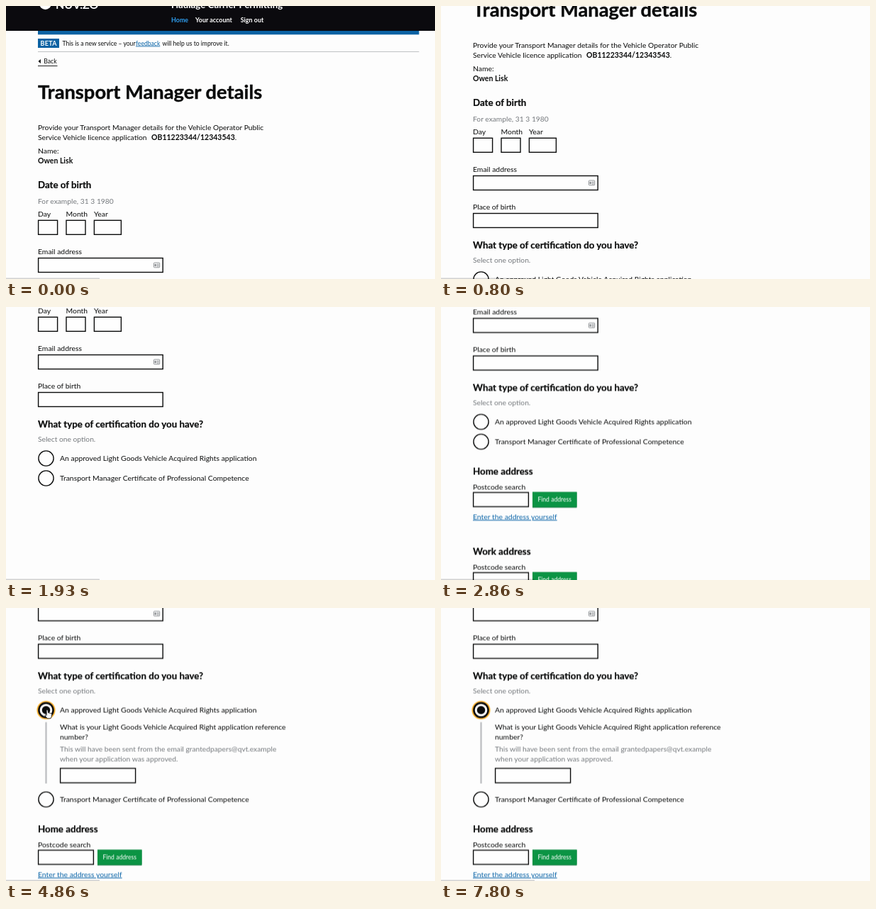
Animation of 605x385 px, one loop 7860 ms. Source, as an HTML page:

```html
<!DOCTYPE html>
<html lang="en">
<head>
<meta charset="utf-8">
<title>Transport Manager details</title>
<style>
  html, body { margin: 0; width: 100%; height: 100%; overflow: hidden; background: #fdfdfd; }
  svg { display: block; width: 605px; height: 385px; }

  text { font: 400 10.4px Lato, "Open Sans", sans-serif; fill: #0b0c0c; }
  .bold { font-weight: 700; font-size: 10.5px; }
  .h1 { font-size: 27.3px; font-weight: 700; stroke: #0b0c0c; stroke-width: .4px; }
  .h2 { font-size: 13.3px; font-weight: 700; stroke: #0b0c0c; stroke-width: .2px; }
  .lead { font-size: 10.3px; }
  .small { font-size: 8.6px; }
  .nav { font-size: 8.95px; font-weight: 700; }
  .hint { fill: #75797d; font-size: 10.25px; }
  .white { fill: #fff; stroke: none; }
  .current { fill: #2e9cec; }
  .link { fill: #0b65a8; text-decoration: underline; }
  .field rect, .field circle { fill: #fefefe; stroke: #0b0c0c; stroke-width: 1.4px; }

  /* The clock ticks 15 times a second; the short lead absorbs rounding. */
  .page, .late, .chosen, .below, .hand {
    animation: 7860ms -8ms infinite step-end;
  }
  .page { animation-name: scroll; }
  .late { animation-name: load; }
  .chosen { animation-name: choose; }
  .below { animation-name: push; }
  .hand { animation-name: point; }

  @keyframes scroll {
    0% { transform: translateY(0); animation-timing-function: steps(12); }
    10.178% { transform: translateY(-116px); animation-timing-function: steps(10); }
    18.66% { transform: translateY(-210.5px); animation-timing-function: steps(2); }
    20.356% { transform: translateY(-238.5px); animation-timing-function: steps(5); }
    24.597% { transform: translateY(-288px); animation-timing-function: steps(7); }
    30.534% { transform: translateY(-326px); animation-timing-function: steps(7); }
    36.472% { transform: translateY(-339.5px); animation-timing-function: steps(9); }
    44.105%, 100% { transform: translateY(-357.5px); }
  }
  @keyframes load {
    0% { opacity: 0; }
    31.382%, 100% { opacity: 1; }
  }
  @keyframes choose {
    0% { opacity: 0; }
    55.98%, 100% { opacity: 1; }
  }
  @keyframes push {
    0% { transform: translateY(0); }
    55.98%, 100% { transform: translateY(98px); }
  }
  @keyframes point {
    0% { opacity: 0; transform: translate(40px, 186px); }
    46.65% { opacity: 1; transform: translate(40px, 186px); animation-timing-function: steps(8); }
    53.435% { opacity: 1; transform: translate(58px, 144px); }
    83.12% { opacity: 1; transform: translate(58px, 144px); animation-timing-function: steps(6); }
    88.21%, 100% { opacity: 0; transform: translate(21px, 160px); }
  }
</style>
</head>
<body>
<svg viewBox="0 0 605 385">
  <defs>
    <g id="finder">
      <text x="45" y="596.5">Postcode search</text>
      <g class="field"><rect x="45.6" y="601.1" width="77.8" height="20"/></g>
      <rect x="129" y="600.5" width="62.5" height="22" fill="#0a7236"/>
      <rect x="129" y="600.5" width="62.5" height="21" fill="#0b9444"/>
      <text class="small white" x="160.2" y="613.5" text-anchor="middle">Find address</text>
    </g>
    <linearGradient id="shade" x2="0" y2="1">
      <stop offset="0" stop-color="#000" stop-opacity="0"/>
      <stop offset="1" stop-color="#000" stop-opacity=".22"/>
    </linearGradient>
  </defs>

  <g class="page">
    <!-- Header -->
    <rect y="-60" width="605" height="95" fill="#0b0a0e"/>
    <circle class="white" cx="55.5" cy="-3.5" r="8.5"/>
    <text class="bold white" x="70" y="3.5" style="font-size:16px">NUV.ZO</text>
    <text class="h2 white" x="233" y="3">Haulage Carrier Permitting</text>
    <text class="nav current" x="233" y="23.3">Home</text>
    <text class="nav white" x="267" y="23.3">Your account</text>
    <text class="nav white" x="330.7" y="23.3">Sign out</text>
    <rect x="45" y="35" width="537.5" height="5.3" fill="#0b62a3"/>

    <!-- Phase banner -->
    <rect x="45" y="46" width="30" height="13" fill="#0b62a3"/>
    <text class="nav white" x="60.2" y="55.7" text-anchor="middle" letter-spacing=".4">BETA</text>
    <text class="small" x="79.5" y="55.5">This is a new service – your</text>
    <text class="small link" x="183" y="55.5">feedback</text>
    <text class="small" x="220.5" y="55.5">will help us to improve it.</text>
    <path d="M45 64.5H582.5" stroke="#bfc1c3"/>
    <path d="M45.5 78l3.4-3v6z" fill="#0b0c0c"/>
    <text class="small" x="53.3" y="81.3">Back</text>
    <path d="M45 84.5H72.5" stroke="#0b0c0c" stroke-width=".9"/>

    <!-- Details -->
    <text class="h1" x="45" y="131">Transport Manager details</text>
    <text class="lead" x="45" y="174.8">Provide your Transport Manager details for the Vehicle Operator Public</text>
    <text class="lead" x="45" y="188.8">Service Vehicle licence application</text>
    <text x="205" y="188.8"><tspan class="bold">OB11223344/12343543</tspan>.</text>
    <text x="45" y="208.3">Name:</text>
    <text class="bold" x="45" y="222">Owen Lisk</text>

    <text class="h2" x="45" y="257">Date of birth</text>
    <text class="hint" x="45" y="278.7">For example, 31 3 1980</text>
    <text x="45" y="296.7">Day</text>
    <text x="84.5" y="296.7">Month</text>
    <text x="124" y="296.7">Year</text>
    <text x="45" y="349.8">Email address</text>
    <text x="45" y="402.8">Place of birth</text>
    <g class="field">
      <rect x="45.6" y="302.3" width="27" height="20"/>
      <rect x="85" y="302.3" width="27" height="20"/>
      <rect x="124.4" y="302.3" width="38" height="20"/>
      <rect x="45.6" y="355.5" width="175.6" height="20"/>
      <rect x="45.6" y="408.5" width="175.6" height="20"/>
    </g>
    <g fill="none" stroke="#8a8d90" stroke-width=".9">
      <rect x="208.5" y="362" width="8.2" height="6.8" rx=".8"/>
      <path d="M212.8 364h2.8M212.8 365.6h2.8M212.8 367.2h2.8"/>
      <path d="M210 364.2h1.6v2.6h-1.6z" fill="#8a8d90"/>
    </g>

    <!-- Certification -->
    <text class="h2" x="45" y="457.5">What type of certification do you have?</text>
    <text class="hint" x="45" y="478.2">Select one option.</text>
    <circle class="chosen" cx="56.5" cy="501.5" r="11.8" fill="none" stroke="#f9b233" stroke-width="2.6"/>
    <g class="field"><circle cx="56.5" cy="501.5" r="10.6"/></g>
    <text x="76" y="505.2">An approved Light Goods Vehicle Acquired Rights application</text>
    <g class="chosen">
      <circle cx="56.5" cy="501.5" r="9.8" fill="none" stroke="#0b0c0c" stroke-width="2"/>
      <circle cx="56.5" cy="501.5" r="5.8" fill="#0b0c0c"/>
      <rect x="55.3" y="518.5" width="2.4" height="86.5" fill="#bfc1c3"/>
      <text x="76" y="529">What is your Light Goods Vehicle Acquired Right application reference</text>
      <text x="76" y="542.7">number?</text>
      <text class="hint" x="76" y="559.7">This will have been sent from the email grantedpapers@qvt.example</text>
      <text class="hint" x="76" y="573.5">when your application was approved.</text>
      <g class="field"><rect x="76.6" y="583.6" width="106" height="20.4"/></g>
    </g>

    <g class="below">
      <g class="field"><circle cx="56.5" cy="529.5" r="10.6"/></g>
      <text x="76" y="533.2">Transport Manager Certificate of Professional Competence</text>
      <g class="late">
        <text class="h2" x="45" y="575.5">Home address</text>
        <use href="#finder"/>
        <text class="link" x="45" y="638.7">Enter the address yourself</text>
        <text class="h2" x="45" y="688.5">Work address</text>
        <use href="#finder" y="113"/>
      </g>
    </g>
  </g>

  <g class="hand">
    <path d="M-1 0q1.2-1.2 2 .2l.6 3.6 3.6.7q1.6.5 1.4 2l-.6 3.2-1 2.1H.2l-2.9-3.7q-.9-1.5.7-1.5l1.3.9z"
      fill="#fff" stroke="#0b0c0c" stroke-width=".8" stroke-linejoin="round"/>
  </g>

  <!-- Edge of the browser's status bubble -->
  <rect y="382.5" width="132" height="2.5" fill="url(#shade)"/>
</svg>
</body>
</html>
```
